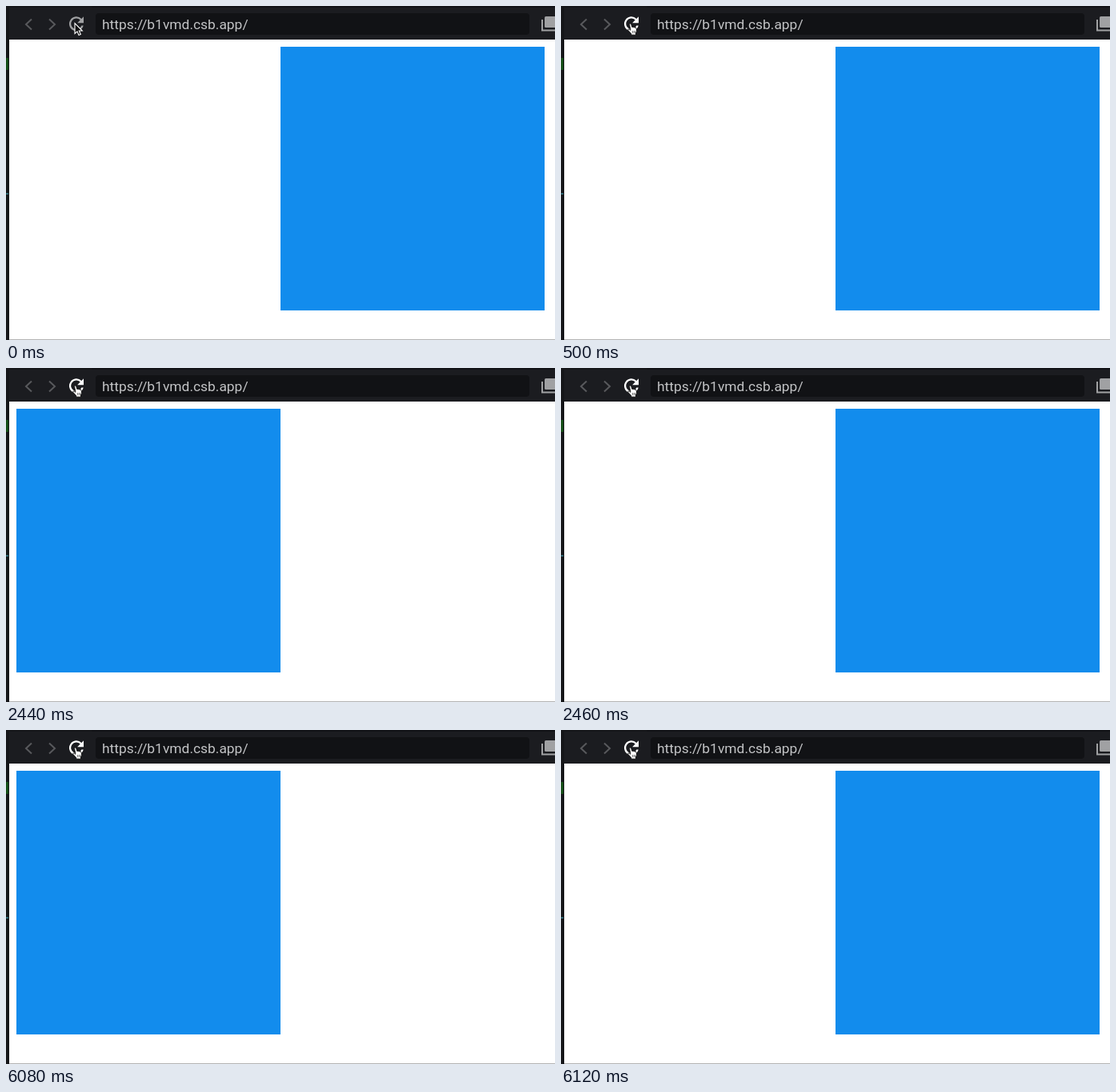
Write an HTML page that moves like this. It is 686 px wide and 418 px high and loops after 8000 ms.

```html
<!DOCTYPE html>
<html lang="en">
<head>
<meta charset="utf-8">
<title>Reload flash</title>
<style>
  html, body { margin: 0; width: 100%; height: 100%; overflow: hidden; background: #151619; }
  svg { display: block; }
  text { font: 17.4px Roboto, sans-serif; fill: #c3c4c6; }
</style>
</head>
<body>
<svg width="686" height="418" viewBox="0 0 686 418">
  <!-- editor edge -->
  <rect width="686" height="418" fill="#151619"/>
  <rect y="65" width="3" height="15" fill="#144d16"/>
  <rect y="234" width="3" height="2" fill="#2d6672"/>

  <!-- browser bar -->
  <rect x="4" y="2" width="682" height="40" fill="#1b1c20"/>
  <rect x="107" width="579" height="2" fill="#111216"/>
  <rect x="112" y="9" width="542" height="27" rx="4" fill="#111215"/>
  <g fill="none" stroke="#58595c" stroke-width="2">
    <path d="M32 16.5L25 23l7 6.5"/>
    <path d="M54 16.5L61 23l-7 6.5"/>
  </g>
  <path id="reload" transform="translate(74.5 8.8) scale(1.125)" d="M17.65 6.35A8 8 0 1 0 19.73 14h-2.08A6 6 0 1 1 16.22 7.78L13 11h7V4z"/>
  <text x="120" y="29">https://b1vmd.csb.app/</text>
  <rect x="673" y="13" width="15" height="14" rx="1.5" fill="#a0a1a3"/>
  <path d="M670 17v13.5h16" fill="none" stroke="#a0a1a3" stroke-width="2"/>

  <!-- page -->
  <rect x="4" y="42" width="682" height="375" fill="#fff"/>
  <rect x="4" y="417" width="682" height="1" fill="#b4b4b4"/>
  <rect id="box" y="51" width="330" height="330" fill="#128ced"/>

  <!-- pointers -->
  <path id="arrow" d="M86 21.5v13l3-2.7 2 4.7 2.3-1-2-4.5h4z" fill="#111" stroke="#fff" stroke-width="1.1"/>
  <path id="hand" d="M85.6 23.6c-.5-1.7 1.7-2.2 2.2-.6l1.1 3.6c.6-.7 1.7-.5 1.9.2.7-.5 1.7-.2 1.9.6.9-.4 1.6.2 1.7 1l.2 3.1-1.1 2.4v2.3h-5.6l-.4-1.8-3.5-3.8c-.9-1.2.6-2.2 1.6-1.3l1.3 1z" fill="#fff" stroke="#111" stroke-width="1"/>
  <path id="fingers" d="M89.3 31v3M91.1 31v3M92.8 31v3" stroke="#111" stroke-width=".6"/>
</svg>
<script>
  const LOOP = 8000, HOVER = 500, LEFT = 13, RIGHT = 343;
  // Each reload blanks the page, then shows the box on the left before it jumps right.
  const reloads = [
    { blank: 2020, left: 2440, right: 2460 },
    { blank: 5680, left: 6080, right: 6120 },
  ];
  const $ = id => document.getElementById(id);
  const show = (id, on) => $(id).setAttribute('visibility', on ? 'visible' : 'hidden');

  function draw(now) {
    const t = now % LOOP;
    const hover = t >= HOVER;
    const reload = reloads.find(r => t >= r.blank && t < r.right);
    show('arrow', !hover);
    show('hand', hover);
    show('fingers', hover);
    $('reload').setAttribute('fill', hover ? '#fff' : '#a0a1a3');
    show('box', !reload || t >= reload.left);
    $('box').setAttribute('x', reload ? LEFT : RIGHT);
    requestAnimationFrame(() => draw(performance.now()));
  }
  draw(performance.now());
</script>
</body>
</html>
```
